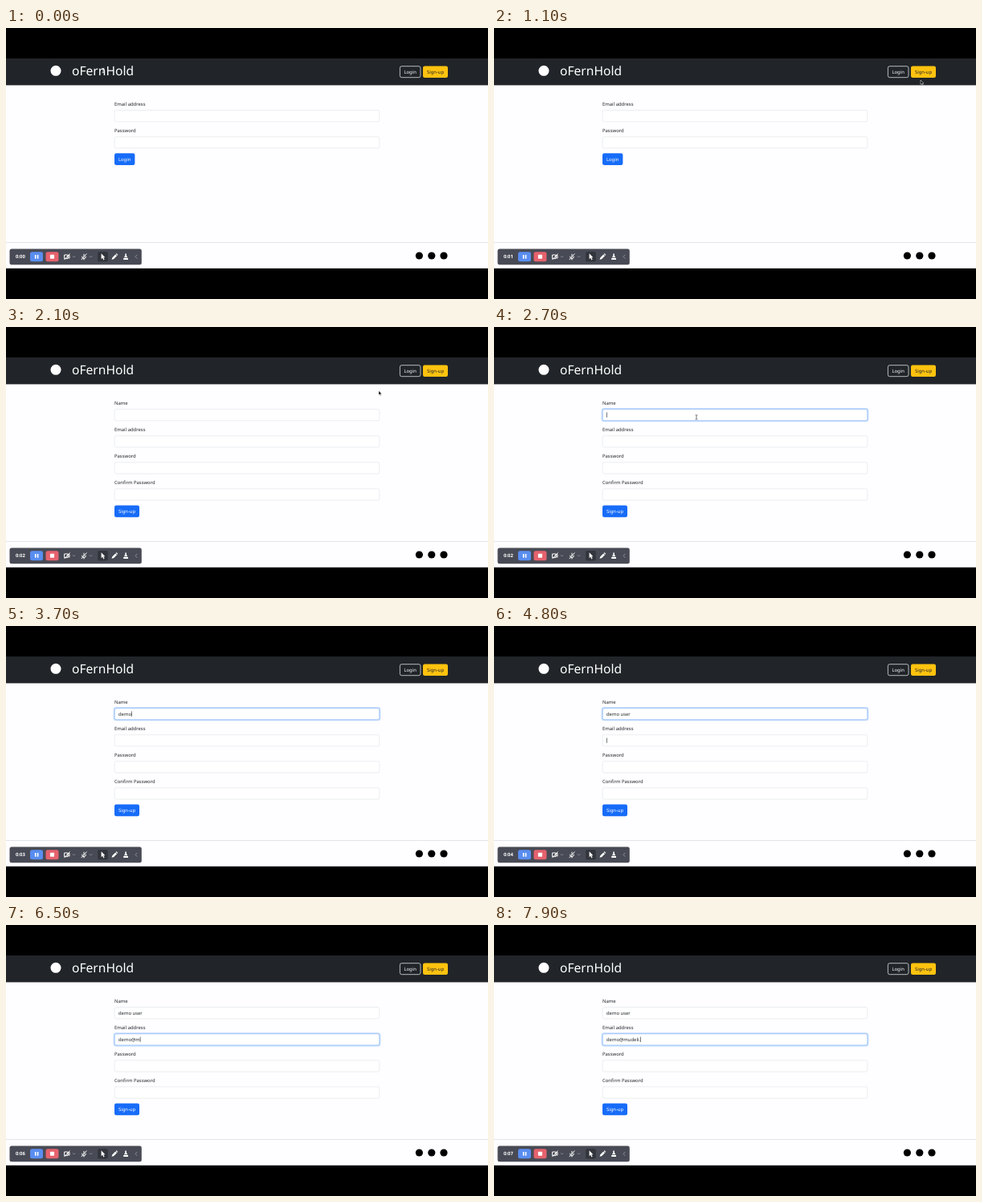
These frames come from a looping animation (600 px wide and 338 px high, 8000 ms). An HTML page:

```html
<!DOCTYPE html>
<html lang="en">
<head>
<meta charset="utf-8">
<title>Sign-up form</title>
<style>
  html, body { margin: 0; width: 100%; height: 100%; overflow: hidden; background: #000; }
  svg { display: block; width: 100%; height: 100%; }
  text { font: 5.9px "Noto Sans", "Open Sans", sans-serif; fill: #212529; white-space: pre; text-rendering: geometricPrecision; }
  .mid { text-anchor: middle; }
  .light { fill: #fff; }
  .icon { fill: none; stroke: #fff; stroke-width: 1; stroke-linecap: round; stroke-linejoin: round; }
  .dim { stroke: #aaadb5; stroke-width: .7; }
</style>
</head>
<body>
<svg viewBox="0 0 600 338">
  <rect width="600" height="338"/>
  <rect y="38" width="600" height="261.7" fill="#fefdff"/>
  <rect y="38" width="600" height="33.4" fill="#212529"/>
  <rect y="267" width="600" height=".8" fill="#dcdfe3"/>
  <rect y="299" width="600" height=".7" fill="#d5d8de"/>

  <circle cx="62" cy="53.3" r="6.5" fill="#fff"/>
  <text class="light" x="82" y="59" style="font-size:15.6px;font-weight:500">oFernHold</text>
  <rect x="490.4" y="47.7" width="25.6" height="14" rx="2.2" fill="none" stroke="#f8f9fa" stroke-width=".7"/>
  <text class="mid light" x="503.2" y="56.7">Login</text>
  <rect id="join" x="519" y="47.4" width="31" height="14.6" rx="2.2"/>
  <text class="mid" x="534.5" y="56.7">Sign-up</text>

  <g id="login"></g>
  <g id="signup"></g>
  <rect id="caret" width=".6" height="6.4" fill="#212529"/>

  <circle cx="514.4" cy="284" r="4.6"/>
  <circle cx="529.8" cy="284" r="4.6"/>
  <circle cx="545" cy="284" r="4.6"/>

  <g id="toolbar">
    <rect x="4.5" y="275.5" width="164.3" height="19.8" rx="2.5" fill="#484b55"/>
    <text id="clock" class="light" x="12" y="287.3" style="font-weight:600"></text>
    <rect x="30" y="279.3" width="16" height="12" rx="2.5" fill="#598df0"/>
    <path d="M36.7 282.9v4.8M39.6 282.9v4.8" stroke="#fff" stroke-width="1.6"/>
    <rect x="49.5" y="279.3" width="16" height="12" rx="2.5" fill="#e5626e"/>
    <rect x="54.9" y="282.8" width="5.2" height="5" rx=".8" fill="#fff"/>
    <g class="icon">
      <path d="M73 283h4v4.6h-4zM77 284.6l2-1.2v3.8l-2-1.2M72.8 288.8l6.4-7"/>
      <path d="M97 282.2v3.2M94.6 285.2q0 2.4 2.4 2.4t2.4-2.4M97 287.6v1.4M94 288.8l6.2-7"/>
      <path class="dim" d="M83.4 284.8l1.2 1.2 1.2-1.2M104.4 284.8l1.2 1.2 1.2-1.2M163 283.2l-2 2.1 2 2.1"/>
    </g>
    <rect x="114.2" y="279" width="12.6" height="12.6" rx="2" fill="#33353d"/>
    <g fill="#fff">
      <path d="M118.6 281.2v7l1.6-1.4 1.2 2.6 1.2-.6-1.2-2.5h2z"/>
      <path d="M131.6 288.8l.6-2.4 4-4 1.8 1.8-4 4zM136.7 281.9l.8-.8 1.8 1.8-.8.8z"/>
      <path d="M148.3 281.4h1.6v2.4l1.4 2.4h-4.4l1.4-2.4zM146.2 286.9h5.8v2h-5.8z"/>
    </g>
  </g>

  <g id="pointer">
    <path id="arrow" d="M0 0v5.4l1.3-1.1.9 2 .9-.4-.9-1.9h1.7z" stroke="#fff" stroke-width=".5"/>
    <path id="hand" d="M-.6 0h1.1v2.2l2 .6-.3 3h-3l-1.6-2.4.7-.5 1.1.7z" fill="#fff" stroke="#000" stroke-width=".6"/>
    <path id="beam" d="M-1.4 -2.8Q0 -2.8 0 -2Q0 -2.8 1.4 -2.8M0 -2V2M-1.4 2.8Q0 2.8 0 2Q0 2.8 1.4 2.8" fill="none" stroke-width=".8"/>
  </g>
</svg>
<script>
const LOOP = 8000, SWITCH = 1400, TAB = 4800;
const $ = id => document.getElementById(id);
const clamp = v => Math.max(0, Math.min(1, v));
const ramp = (t, from, to) => clamp((t - from) / (to - from));
const show = (el, on) => el.style.display = on ? '' : 'none';

// Form rows share one pitch; the button follows the last row.
function buildForm(id, labels, caption, width) {
  const rows = labels.map((label, i) => {
    const y = 33.1 * i;
    return `<text x="135" y="${96.8 + y}">${label}</text>
      <rect x="135.2" y="${102.6 + y}" width="329.6" height="14.2" rx="2.2" fill="#fff" stroke="#dee2e6" stroke-width=".6"/>
      <g class="ring" fill="none" opacity="0">
        <rect x="134.4" y="${101.8 + y}" width="331.2" height="15.8" rx="2.8" stroke="#c2dbfe" stroke-width="1.5"/>
        <rect x="135.2" y="${102.6 + y}" width="329.6" height="14.2" rx="2.2" stroke="#86b7fe" stroke-width=".6"/>
      </g>
      <text class="value" x="140" y="${111.7 + y}"></text>`;
  });
  const top = 90 + 33.1 * labels.length;
  $(id).innerHTML = rows.join('') +
    `<rect x="135" y="${top}" width="${width}" height="14.8" rx="2.2" fill="#176cf8"/>
     <text class="mid light" x="${135 + width / 2}" y="${top + 9.4}">${caption}</text>`;
}
buildForm('login', ['Email address', 'Password'], 'Login', 25.4);
buildForm('signup', ['Name', 'Email address', 'Password', 'Confirm Password'], 'Sign-up', 31);

const rings = $('signup').querySelectorAll('.ring');
const values = $('signup').querySelectorAll('.value');

// One key time per character.
const typing = [
  ['demo user', [2800, 3000, 3500, 3700, 4000, 4300, 4400, 4500, 4600]],
  ['demo@mudeli.', [5200, 5400, 5600, 5800, 6000, 6500, 6700, 6900, 7000, 7100, 7300, 7900]]
];

const path = [[200, 121, 53], [1000, 531, 67], [1100, 531, 65], [1300, 533, 57],
  [1700, 533, 57], [1950, 512, 72], [2500, 252, 112.5]];

function pointerAt(t) {
  const i = path.findIndex(p => p[0] > t);
  if (i < 0) return path[path.length - 1].slice(1);
  if (i === 0) return path[0].slice(1);
  const [t0, x0, y0] = path[i - 1], [t1, x1, y1] = path[i];
  const k = ramp(t, t0, t1), e = k * k * (3 - 2 * k);
  return [x0 + (x1 - x0) * e, y0 + (y1 - y0) * e];
}

function drawPointer(t) {
  const [x, y] = pointerAt(t);
  const overJoin = x > 519 && x < 550 && y > 47 && y < 62;
  const overTitle = x > 82 && x < 159 && y < 62;
  const overField = x > 135 && x < 465 && y > 102 && y < 117;
  const beam = overTitle || overField;
  show($('pointer'), t < 2800);
  show($('hand'), overJoin);
  show($('beam'), beam);
  show($('arrow'), !overJoin && !beam);
  $('beam').setAttribute('stroke', overTitle ? '#fff' : '#555');
  $('pointer').setAttribute('transform', `translate(${x} ${y})`);
  $('join').setAttribute('fill', overJoin ? '#ffca2c' : '#ffc30f');
}

function draw(t) {
  $('clock').textContent = '0:0' + Math.floor(t / 1000);
  show($('login'), t < SWITCH);
  show($('signup'), t >= SWITCH);
  drawPointer(t);

  typing.forEach(([text, keys], i) => {
    values[i].textContent = text.slice(0, keys.filter(k => k <= t).length);
  });
  const move = ramp(t, TAB + 50, TAB + 200);
  rings[0].setAttribute('opacity', ramp(t, 2520, 2670) * (1 - move));
  rings[1].setAttribute('opacity', move);

  const row = t < TAB ? 0 : 1, value = values[row];
  show($('caret'), t >= 2520);
  const width = value.textContent ? value.getComputedTextLength() : 0;
  $('caret').setAttribute('x', 140 + width);
  $('caret').setAttribute('y', 106.4 + 33.1 * row);
}

const start = performance.now();
function tick() {
  draw((performance.now() - start) % LOOP);
  requestAnimationFrame(tick);
}
tick();
</script>
</body>
</html>
```
